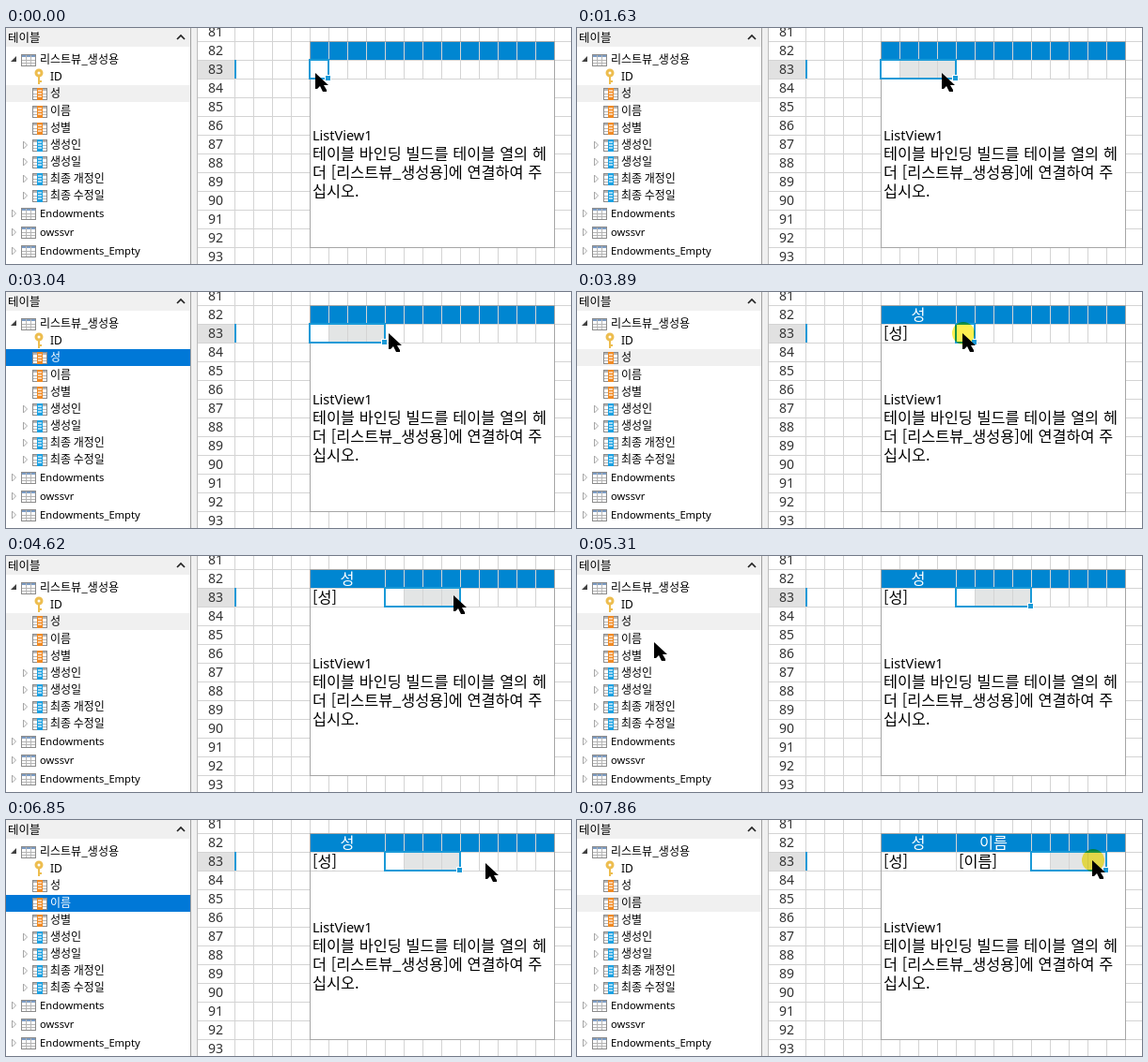
These frames come from a looping animation (601 px wide and 252 px high, 8 s). An HTML page with a canvas:

```html
<!DOCTYPE html>
<html lang="ko">
<head>
<meta charset="utf-8">
<style>
html, body { margin: 0; width: 100%; height: 100%; overflow: hidden; background: #fff; }
canvas { display: block; }
</style>
</head>
<body>
<canvas id="stage" width="601" height="252"></canvas>
<script>
const ctx = document.getElementById('stage').getContext('2d');
const LOOP = 8000, STEP = 76.7, CELL = 20, LEFT = 323, TOP = 14;
const GRID = '#d4d4d4', BORDER = '#a6a6a6', BLUE = '#0086d1', SELECT = '#1a9ad7';
const KOREAN = '"Noto Sans CJK KR", "Noto Sans CJK", sans-serif';
const LATIN = '"Noto Sans", "Open Sans", sans-serif';

// For each column: cells are selected, then a field is carried from the tree and bound
const columns = [
  { name: '성', select: [850, 1630], carry: [2260, 2960] },
  { name: '이름', select: [3890, 4620], carry: [5460, 6460] },
  { select: [7460, LOOP] }
];
columns.forEach((column, i) => {
  column.left = LEFT + i * 4 * CELL;
  column.bindAt = column.carry ? column.carry[1] + 465 : Infinity;
});

// Pointer strokes: start, end, destination
const strokes = [
  [530, 700, 329, 45], [1020, 1400, 388, 48], [1710, 2090, 132, 74],
  [2340, 2810, 341, 45], [2960, 3110, 410, 44], [4060, 4300, 476, 42],
  [4700, 5310, 82, 92], [5540, 6000, 445, 39], [6460, 6850, 510, 46],
  [6920, 7310, 490, 43], [7540, 7860, 548, 43]
];

const fields = ['ID', '성', '이름', '성별', '생성인', '생성일', '최종 개정인', '최종 수정일'];
const tables = ['Endowments', 'owssvr', 'Endowments_Empty'];

const within = (t, span) => span && t >= span[0] && t < span[1];

function box(x, y, w, h, color) {
  ctx.fillStyle = color;
  ctx.fillRect(x, y, w, h);
}

function frame(x, y, w, h, color) {
  ctx.strokeStyle = color;
  ctx.lineWidth = 1;
  ctx.strokeRect(x + .5, y + .5, w - 1, h - 1);
}

function text(str, x, baseline, size, family, color = '#000', align = 'left') {
  ctx.font = `${size}px ${family}`;
  ctx.fillStyle = color;
  ctx.textAlign = align;
  ctx.fillText(str, x, baseline);
}

function polygon(points, x, y, fill, stroke) {
  ctx.beginPath();
  points.forEach(([px, py]) => ctx.lineTo(x + px, y + py));
  ctx.closePath();
  ctx.fillStyle = fill;
  ctx.fill();
  if (!stroke) return;
  ctx.strokeStyle = stroke;
  ctx.lineWidth = 1;
  ctx.stroke();
}

// The pointer advances in discrete steps and slows down towards its destination
function pointerAt(t) {
  let x = 329, y = 48;
  for (const [start, end, toX, toY] of strokes) {
    if (t < start) break;
    const steps = Math.round((end - start) / STEP) + 1;
    const p = Math.min(1, (Math.floor((t - start + 8) / STEP) + 1) / steps);
    const eased = 1 - (1 - p) ** 3;
    x += (toX - x) * eased;
    y += (toY - y) * eased;
  }
  return [Math.round(x), Math.round(y)];
}

function drawKey(x, y) {
  ctx.strokeStyle = '#edbd4f';
  ctx.lineWidth = 3;
  ctx.beginPath();
  ctx.arc(x + 7, y - 4, 3, 0, 7);
  ctx.stroke();
  box(x + 6, y - 1, 2, 9, '#edbd4f');
  box(x + 8, y + 4, 2, 2, '#edbd4f');
}

function drawTable(x, y, accent, header) {
  box(x, y - 6, 16, 13, '#fff');
  box(x, y - 6, 16, 3, header);
  for (const dy of [0, 3]) box(x + 1, y + dy, 14, 1, '#b5b5b5');
  for (const dx of [5, 10]) box(x + dx, y - 5, 1, 11, '#b5b5b5');
  frame(x, y - 6, 16, 13, '#8b8b8b');
  if (!accent) return;
  box(x + 5, y - 6, 6, 13, accent);
  for (let dy = -4; dy < 5; dy += 3) box(x + 6, y + dy, 4, 2, 'rgba(255,255,255,.6)');
}

function drawExpander(x, y) {
  polygon([[0, 0], [4, 4], [0, 8]], x, y - 4, '#fff', '#a6a6a6');
}

function drawTree(t) {
  box(0, 0, 196, 20, '#f0f0f0');
  text('테이블', 2, 15, 12.5, KOREAN);
  ctx.strokeStyle = '#222';
  ctx.lineWidth = 1.7;
  ctx.beginPath();
  [[182, 12], [186, 8], [190, 12]].forEach(point => ctx.lineTo(...point));
  ctx.stroke();
  box(196, 0, 8, 252, '#f0f0f0');
  box(196, 0, 1, 252, '#a0a0a0');

  polygon([[6, 0], [6, 6], [0, 6]], 5, 30, '#404040');
  drawTable(16, 34, null, '#7d9dc4');
  text('리스트뷰_생성용', 36, 38, 12, KOREAN);

  const touched = columns.filter(c => c.carry && t >= c.carry[0]).pop() || columns[0];
  const active = within(t, [touched.carry[0], touched.bindAt]);
  fields.forEach((field, i) => {
    const y = Math.round(52.3 + i * 18.1), chosen = field === touched.name;
    if (chosen) box(0, y - 9, 196, 18, active ? '#0078d7' : '#f0f0f0');
    if (i > 3) drawExpander(18.5, y);
    if (i) drawTable(28, y, i > 3 ? '#1ba1e2' : '#f08a24', '#b5b5b5');
    else drawKey(28, y);
    text(field, 47, y + 4, 12, i ? KOREAN : LATIN, chosen && active ? '#fff' : '#000');
  });
  tables.forEach((table, i) => {
    const y = 198 + i * CELL;
    drawExpander(6.5, y);
    drawTable(16, y, null, '#7d9dc4');
    text(table, 36, y + 4, 11.2, LATIN);
  });
}

function drawSheet(t) {
  for (let x = 243; x < 601; x += CELL) box(x, 0, 1, 252, GRID);
  for (let y = TOP; y < 252; y += CELL) box(204, y, 397, 1, GRID);
  box(203, 0, 1, 252, '#bdbdbd');
  box(204, 35, 39, 19, '#e1e1e1');
  box(243, 34, 2, 20, SELECT);
  for (let row = 81; row <= 93; row++) {
    text(row, 223, 9 + (row - 81) * CELL, 14, LATIN, '#333', 'center');
  }
  drawListView(t);
}

function drawListView(t) {
  const bound = columns.filter(c => t >= c.bindAt);
  const selection = selectionAt(t);
  box(LEFT, TOP, 261, 221, '#fff');
  box(LEFT, TOP, 261, CELL, BLUE);
  if (!bound.includes(selection.column)) {
    box(selection.left + CELL, 35, selection.width - CELL, 19, '#e3e5e5');
  }
  for (let x = LEFT + CELL; x < LEFT + 260; x += CELL) {
    const merged = bound.some(c => x > c.left && x < c.left + 4 * CELL);
    if (!merged) box(x, TOP, 1, 2 * CELL, GRID);
  }
  for (const y of [34, 54]) box(LEFT, y, 261, 1, GRID);
  frame(LEFT, TOP, 261, 221, BORDER);

  ctx.wordSpacing = '1.2px';
  text('ListView1', 326, 120, 14.5, LATIN);
  ['테이블 바인딩 빌드를 테이블 열의 헤', '더 [리스트뷰_생성용]에 연결하여 주', '십시오.']
    .forEach((line, i) => text(line, 326, 140 + i * CELL, 16.3, KOREAN));
  ctx.wordSpacing = '0px';
  for (const { name, left } of bound) {
    text(name, left + 40, 30, 16.3, KOREAN, '#fff', 'center');
    text(`[${name}]`, left + 3, 50, 16.3, KOREAN);
  }
  drawSelection(selection);
}

function selectionAt(t) {
  const column = columns.filter(c => t >= c.select[0]).pop() || columns[0];
  const reach = Math.ceil((pointerAt(t)[0] - column.left) / CELL);
  const cells = t < column.select[1] ? Math.max(1, Math.min(4, reach)) : 4;
  return { column, left: column.left, width: cells * CELL };
}

function drawSelection({ left, width }) {
  const right = left + width;
  ctx.strokeStyle = SELECT;
  ctx.lineWidth = 2;
  ctx.strokeRect(left, 34, width, CELL);
  box(right - 4, 50, 7, 7, '#fff');
  box(right - 3, 51, 5, 5, SELECT);
}

function drawPointer(t) {
  const [x, y] = pointerAt(t);
  if (columns.some(c => within(t, c.carry) && t >= c.carry[0] + STEP)) drawCarryPointer(x, y);
  else polygon([[0, 0], [0, 17], [2, 17], [5, 14], [8, 20], [12, 20], [12, 18], [9, 13], [14, 13]], x, y, '#000');

  if (columns.some(c => within(t, c.select) || within(t, c.carry))) {
    ctx.globalCompositeOperation = 'multiply';
    ctx.fillStyle = 'rgb(253,239,80)';
    ctx.beginPath();
    ctx.arc(x + 1, y, 12, 0, 7);
    ctx.fill();
    ctx.globalCompositeOperation = 'source-over';
  }
}

function drawCarryPointer(x, y) {
  box(x + 2, y + 17, 11, 7, '#fff');
  frame(x + 2, y + 17, 11, 7, '#000');
  polygon([[0, 0], [0, 16], [4, 12], [6, 18], [9, 17], [6, 11], [11, 11]], x + .5, y + .5, '#fff', '#000');
  box(x + 9, y + 19, 12, 12, '#fff');
  frame(x + 9, y + 19, 12, 12, '#000');
  box(x + 12, y + 24, 6, 2, '#000');
  box(x + 14, y + 22, 2, 6, '#000');
}

const started = performance.now();
function draw() {
  const t = (performance.now() - started) % LOOP;
  box(0, 0, 601, 252, '#fff');
  drawTree(t);
  drawSheet(t);
  drawPointer(t);
  requestAnimationFrame(draw);
}
draw();
</script>
</body>
</html>
```
